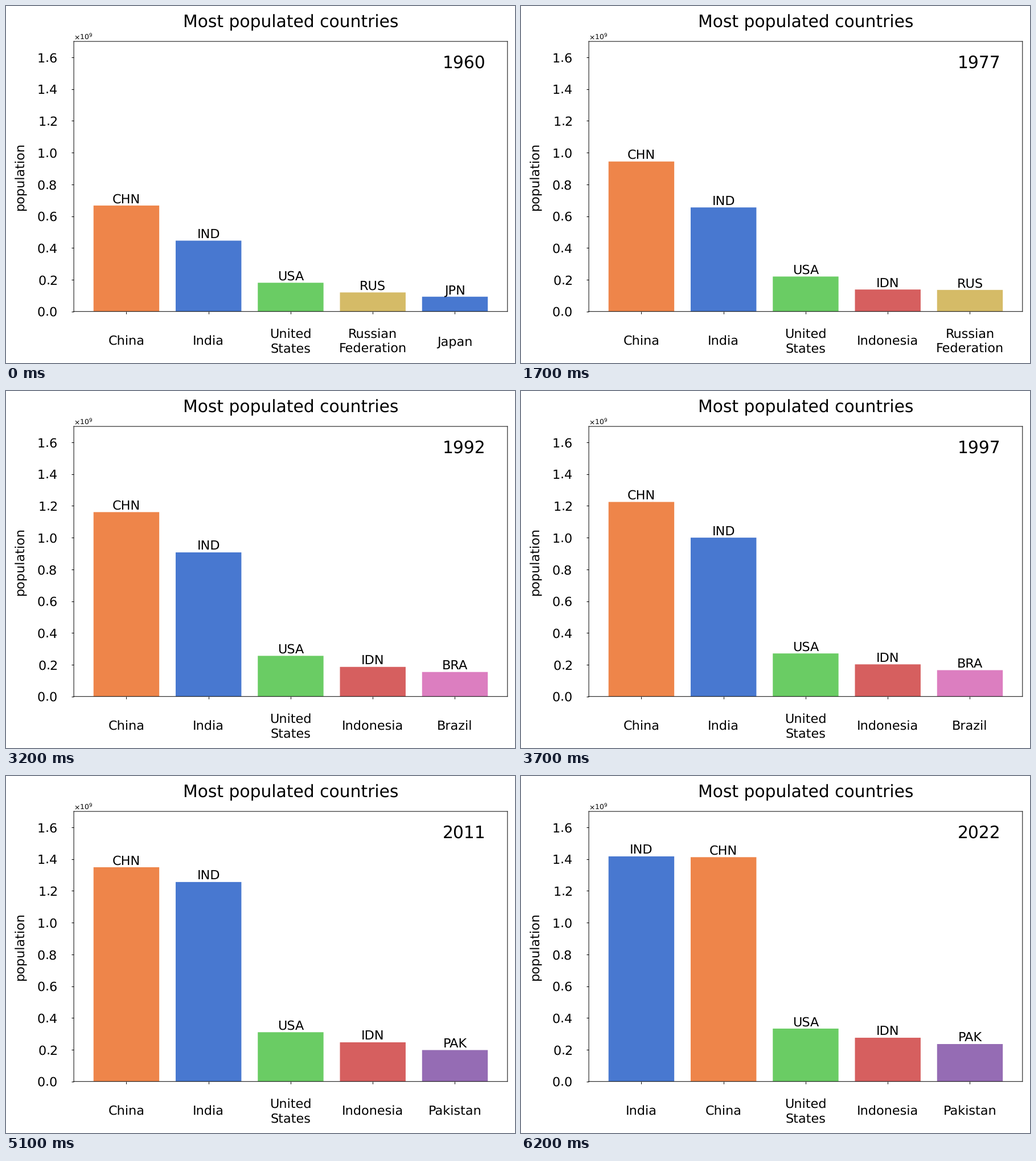
A matplotlib script for the animation above (6.3 s loop, 894 by 626 pixels).

```python
import matplotlib.pyplot as plt
import numpy as np
from matplotlib.animation import FuncAnimation

W, H, DPI = 894, 626, 89.4
LEFT, RIGHT, TOP, BOTTOM = 119.1, 880.8, 62.1, 535.7
FIRST_YEAR, LAST_YEAR = 1960, 2022
TOP_N = 5

BLUE, ORANGE, GREEN, RED = "#4878D0", "#EE854A", "#6ACC64", "#D65F5F"
PURPLE, PINK, YELLOW = "#956CB4", "#DC7EC0", "#D5BB67"

# code: (name, colour, key years and millions of people, steady in between)
COUNTRIES = {
    "CHN": ("China", ORANGE, {1960: 667, 1962: 666, 1974: 900, 1990: 1135,
                              2000: 1263, 2018: 1403, 2022: 1412}),
    "IND": ("India", BLUE, {1960: 446, 1970: 557, 1980: 697, 1990: 870,
                            2010: 1241, 2022: 1417}),
    "USA": ("United\nStates", GREEN, {1960: 181, 1990: 250, 2008: 304,
                                      2022: 333}),
    "RUS": ("Russian\nFederation", YELLOW, {1960: 120, 1990: 148}),
    "IDN": ("Indonesia", RED, {1960: 88.3, 1976: 135.2, 2010: 244,
                               2022: 275.5}),
    "JPN": ("Japan", BLUE, {1960: 93.2, 1965: 98}),
    "BRA": ("Brazil", PINK, {1988: 145, 2010: 196}),
    "PAK": ("Pakistan", PURPLE, {2010: 194.5, 2022: 235.8}),
}


def population(code, year):
    points = COUNTRIES[code][2]
    return 1e6 * np.interp(year, list(points), list(points.values()), left=0)


def ranking(year):
    pops = {code: population(code, year) for code in COUNTRIES}
    return sorted(pops.items(), key=lambda item: -item[1])[:TOP_N]


plt.rcParams["text.hinting"] = "none"
# The small margin keeps the pixel size from rounding down.
fig = plt.figure(figsize=((W + 0.01) / DPI, (H + 0.01) / DPI), dpi=DPI,
                 facecolor="white")
ax = fig.add_axes([LEFT / W, 1 - BOTTOM / H,
                   (RIGHT - LEFT) / W, (BOTTOM - TOP) / H])
slots = np.arange(TOP_N)
bars = ax.bar(slots, np.ones(TOP_N), width=0.8)
codes = [ax.text(x, 0, "", size=18, ha="center", va="bottom") for x in slots]
year_text = ax.text(0.95, 0.95, "", size=24, ha="right", va="top",
                    transform=ax.transAxes)
for shape in [*bars, *ax.spines.values()]:
    shape.set_snap(False)

ax.set_ylim(0, 1.7e9)
ax.set_xticks(slots)
ax.set_title("Most populated countries", size=24, pad=20)
ax.set_ylabel("population", size=18, labelpad=14)
ax.ticklabel_format(axis="y", style="sci", useMathText=True)
ax.tick_params(axis="y", labelsize=18, pad=20)
ax.tick_params(axis="x", labelsize=18, pad=39.5)


def draw(frame):
    year = FIRST_YEAR + frame
    top = ranking(year)
    for bar, label, (code, pop) in zip(bars, codes, top):
        bar.set_height(pop)
        bar.set_facecolor(COUNTRIES[code][1])
        label.set_text(code)
        label.set_y(pop)
    ax.set_xticklabels([COUNTRIES[code][0] for code, _ in top], va="center")
    year_text.set_text(str(year))


anim = FuncAnimation(fig, draw, frames=LAST_YEAR - FIRST_YEAR + 1,
                     init_func=lambda: None, interval=100, repeat=True,
                     repeat_delay=0)
plt.show()
```
